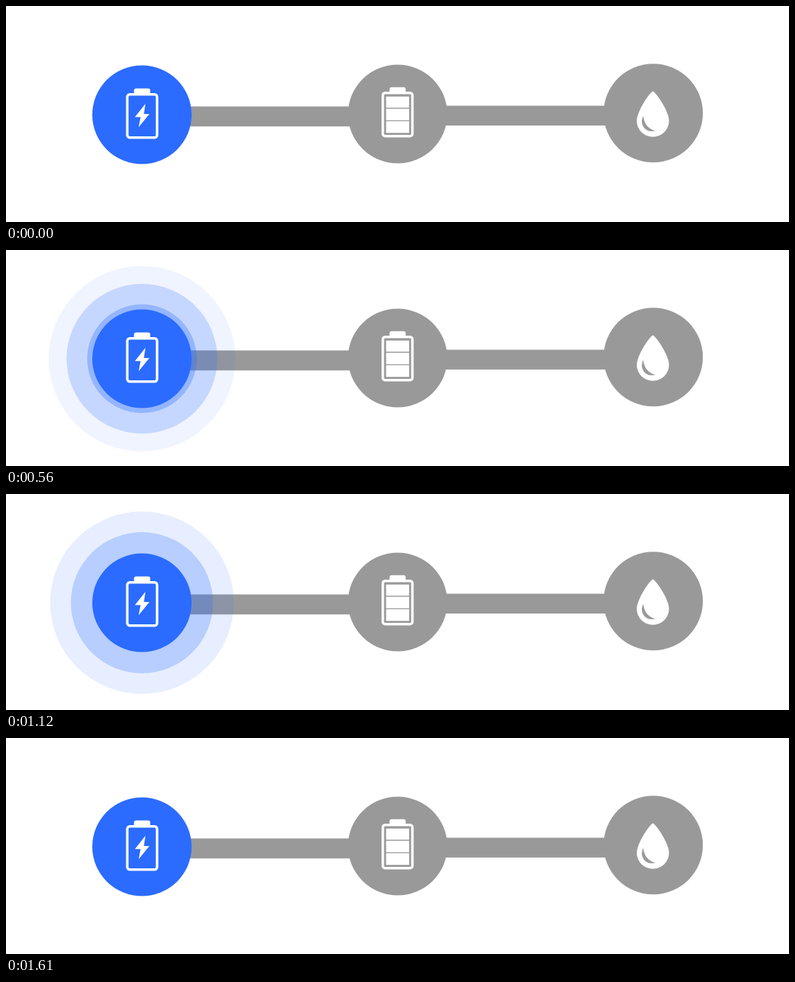
An HTML page for the animation above (1640 ms loop, 1080 by 300 pixels).

```html
<!DOCTYPE html>
<html lang="en">
<head>
<meta charset="utf-8">
<title>Charging steps</title>
<style>
  html, body { margin: 0; width: 100%; height: 100%; overflow: hidden; background: #fff; }
  svg { display: block; width: 100%; height: 100%; }
</style>
</head>
<body>
<svg viewBox="0 0 1080 300" fill="#fff">
  <g fill="#999">
    <path d="M200 139.5H500V167.3H200zM560 138.5H860V166H560z"/>
    <circle cx="540.2" cy="150" r="68.5"/>
    <circle cx="892.7" cy="148.8" r="68.5"/>
  </g>

  <g fill="#2b6bff">
    <g id="rings">
      <circle cx="187.5" cy="151"/>
      <circle cx="187.5" cy="151"/>
      <circle cx="187.5" cy="151"/>
    </g>
    <circle cx="187.5" cy="151" r="68.5"/>
  </g>

  <!-- charging battery -->
  <rect x="176.5" y="114.5" width="22.5" height="10" rx="3"/>
  <rect x="167.3" y="122.8" width="41.1" height="60" rx="3.5" fill="#2b6bff" stroke="#fff" stroke-width="3.5"/>
  <path d="M192.3 135.8L177.8 154.3H185.6L183 168.3L197.8 150H190.2z"/>

  <!-- full battery -->
  <rect x="529" y="112.7" width="22.3" height="10" rx="3"/>
  <rect x="518" y="119" width="44.3" height="63.5" rx="5"/>
  <rect x="521.5" y="122.5" width="37.3" height="56.5" rx="1.5" fill="#999"/>
  <path d="M524.3 125.8h31.8v15.4h-31.8zM524.3 142.7h31.8v16h-31.8zM524.3 159.9h31.8v16.4h-31.8z"/>

  <!-- drop -->
  <path d="M892.2 118.5C895.5 118.5 914.5 146 914.5 159.5A22.25 22.25 0 0 1 870 159.5C870 146 889 118.5 892.2 118.5z"/>
  <path d="M879 153C873.5 162 880 177.5 896 173.3C888 171.5 880.5 166 879 153z" fill="#999"/>
</svg>
<script>
  const LOOP = 1640, STEP = 70;
  const group = document.getElementById('rings');
  const [outer, middle, inner] = group.children;

  // Rises from 0 to 1 at the peak, then falls back to 0.
  const pulse = (t, start, peak, end) =>
    Math.max(0, Math.min((t - start) / (peak - start), (end - t) / (end - peak)));

  // A ring gets paler as it grows.
  function setRing(ring, radius, alpha, growth) {
    ring.setAttribute('r', radius + growth);
    ring.setAttribute('fill-opacity', alpha * (1 - .026 * growth));
  }

  function draw() {
    const t = Math.floor(performance.now() % LOOP / STEP) * STEP;
    const first = 8 * pulse(t, 0, 560, 980);
    const both = first + 4 * pulse(t, 980, 1260, 1470);
    const fade = Math.min(1, Math.max((280 - t) / 210, (t - 280) / 430));

    setRing(inner, 67.5, .4, first);
    setRing(middle, 96, .265, both);
    setRing(outer, 124.7, .12 * fade, Math.min(4, both));
    group.setAttribute('visibility', t >= 70 && t < 1610 ? 'visible' : 'hidden');
    requestAnimationFrame(draw);
  }
  draw();
</script>
</body>
</html>
```
